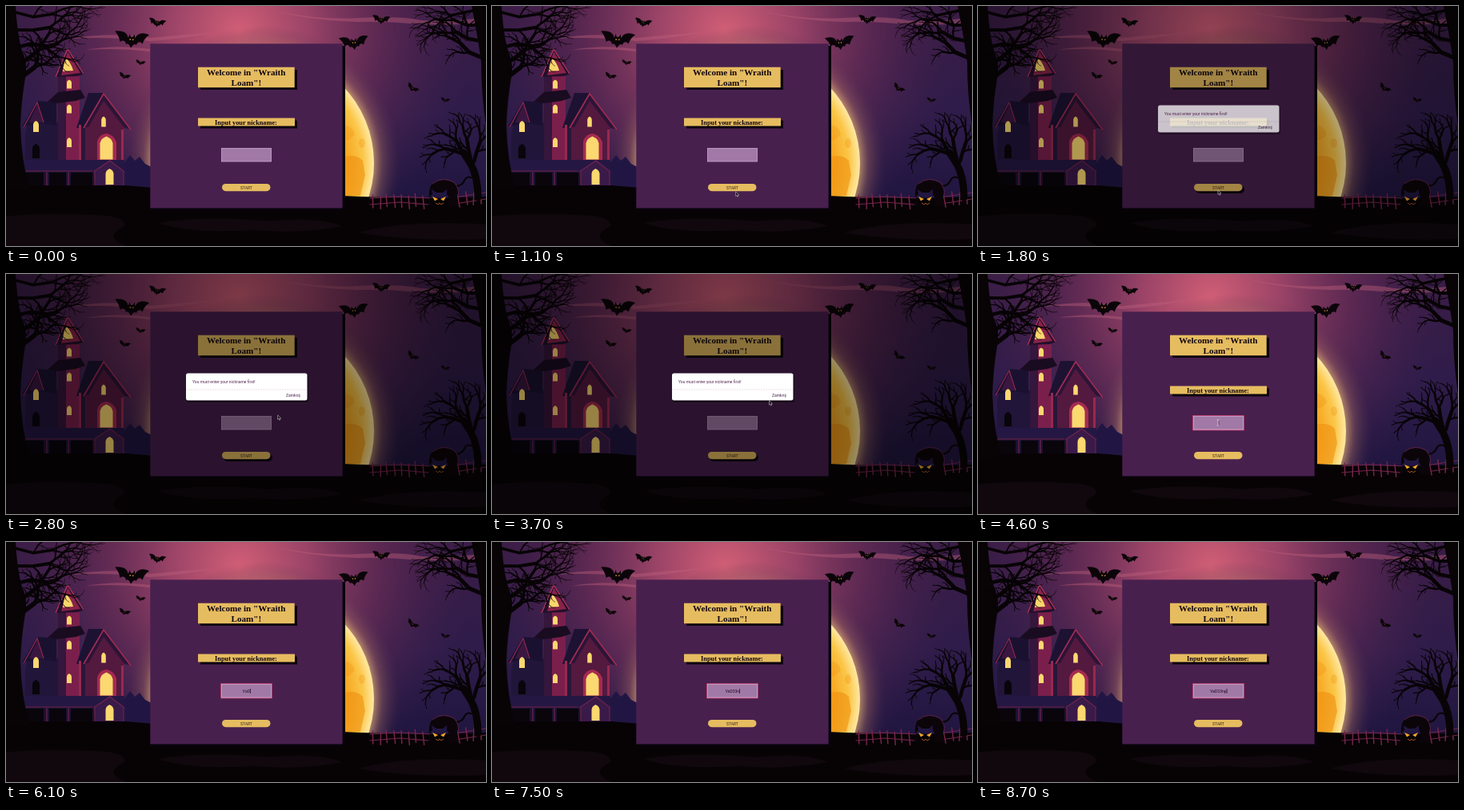
An HTML page for the animation above (8.8 s loop, 600x301 px).

```html
<!DOCTYPE html>
<html lang="en">
<head>
<meta charset="utf-8">
<title>Nickname form</title>
<style>
html, body { margin: 0; width: 100%; height: 100%; overflow: hidden; background: #070305; }
svg { display: block; width: 100%; height: 100%; }
.head { font: bold 11.1px "Liberation Serif", serif; fill: #12060f; text-anchor: middle; }
.ui { font: 5px Roboto, sans-serif; }
.mid { text-anchor: middle; }
</style>
</head>
<body>
<svg viewBox="0 0 600 301" preserveAspectRatio="none">
<defs>
  <linearGradient id="sky" x2="0" y2="1">
    <stop offset="0" stop-color="#3a1d46"/><stop offset=".45" stop-color="#2f1c4a"/><stop offset=".8" stop-color="#201640"/>
  </linearGradient>
  <radialGradient id="dusk" gradientUnits="userSpaceOnUse" cx="292" cy="32" r="290">
    <stop offset="0" stop-color="#d25f76"/><stop offset=".3" stop-color="#a3476a" stop-opacity=".92"/>
    <stop offset=".6" stop-color="#702f58" stop-opacity=".65"/><stop offset="1" stop-color="#45204c" stop-opacity="0"/>
  </radialGradient>
  <radialGradient id="glow" gradientUnits="userSpaceOnUse" cx="321" cy="197" r="172">
    <stop offset=".8" stop-color="#e8b878" stop-opacity=".7"/><stop offset=".87" stop-color="#9c6860" stop-opacity=".4"/>
    <stop offset="1" stop-color="#503050" stop-opacity="0"/>
  </radialGradient>
  <radialGradient id="moon" gradientUnits="userSpaceOnUse" cx="321" cy="197" r="139">
    <stop offset=".76" stop-color="#f7a824"/><stop offset=".9" stop-color="#fbc648"/><stop offset="1" stop-color="#ffe9a4"/>
  </radialGradient>
  <filter id="soft"><feGaussianBlur stdDeviation=".7"/></filter>
  <g id="bat">
    <path fill="#0b0509" d="M-20-8C-12-10-6-8-4-2L-3-6-1-3 1-3 3-6 4-2C6-8 13-10 20-7 16-4 14 0 13 4 10 1 7 2 6 6 4 4 2 6 0 10-2 6-4 4-6 6-7 2-10 1-13 4-14 0-16-4-20-8Z"/>
    <path fill="#f2a63a" d="M-2.500-1L-.5 0-2 1ZM2.500-1L.5 0 2 1Z"/>
  </g>
  <path id="arch" d="M-1 1V-.4Q-.9-.8 0-1 .9-.8 1-.4V1Z"/>
</defs>

<rect width="600" height="301" fill="url(#sky)"/>
<rect width="600" height="301" fill="url(#dusk)"/>
<g fill="#c0607c" opacity=".42">
  <path d="M335 6Q390 18 440 15T520 18Q560 20 600 14V20Q560 26 505 22 470 19 440 20 380 18 335 6Z"/>
  <path d="M80 41Q130 32 180 40 220 36 262 33 225 41 180 44 130 38 80 41Z"/>
  <path d="M100 55Q140 48 180 54V57Q140 52 100 55Z"/>
</g>
<circle cx="321" cy="197" r="172" fill="url(#glow)"/>
<circle cx="321" cy="197" r="139" fill="url(#moon)"/>
<g fill="#f0900f" opacity=".6">
  <path d="M420 190Q436 184 446 194L449 212 443 238H420Z"/>
  <path d="M420 149Q434 150 436 161 430 170 420 168Z" opacity=".5"/>
  <ellipse cx="445" cy="172" rx="4" ry="6" opacity=".5"/>
</g>

<path fill="#211643" d="M132 230V198L141 192 147 198 155 187 161 194 167 189 174 198 184 203V230Z"/>

<g id="house">
  <path fill="#21153a" d="M28 146H68V196H24V160Z"/>
  <path fill="#1a1130" d="M20 151L39 119 63 121V150L46 147Z"/>
  <path fill="#3b1740" d="M39 124L46 146H29Z"/>
  <path fill="none" stroke="#8a2750" stroke-width="1.300" d="M22 152L39 121 47 146"/>
  <path fill="#35163c" d="M65 86H76V196H65Z"/>
  <path fill="#7a1f4c" d="M75 86H92V196H75Z"/>
  <path fill="#28173a" d="M91 148H104V196H91Z"/>
  <path fill="#190c20" d="M52 120L65 108 93 105 99 115 87 119 64 122Z"/>
  <path fill="#23102c" d="M61 89L77 53 98 85 90 88Z"/>
  <path fill="#882349" d="M69 87L77 57 93 84Z"/>
  <path fill="none" stroke="#b93560" stroke-width="1.300" d="M62 89L77 54 97 85"/>
  <path fill="#fbd66c" d="M71 82Q72 70 76 66 82 73 84 81Z"/>
  <path fill="#54193f" d="M99 149L122 114 147 150V196H99Z"/>
  <path fill="#1d1232" d="M88 153L103 109H122L100 152Z"/>
  <path fill="#2c1438" d="M122 109L157 155 148 153 122 119 103 152H97Z"/>
  <path fill="none" stroke="#a32c53" stroke-width="1.600" d="M97 153L122 110 156 155"/>
  <path fill="#a52b50" d="M114 193V170Q117 160 126 160 135 162 138 171V193Z"/>
  <path fill="#97294f" d="M91 149H94V194H91ZM144 155H147V194H144Z"/>
  <path fill="#251743" d="M10 193H148V207H7Z"/>
  <path fill="#1b1231" d="M8 207H148V225H8Z"/>
  <path fill="#09050b" d="M14 209H47V225H14ZM54 209H75V225H54ZM81 209H108V225H81Z"/>
  <path fill="#3a1a48" d="M110 208L130 193 147 208V225H112Z"/>
  <path fill="none" stroke="#70244c" stroke-width="1.200" d="M109 208L130 194 148 208M8 207H108M51 208V225M78 208V225M111 208V225M147 208V225"/>
  <g fill="#fbd870">
    <use href="#arch" transform="translate(79 98)scale(3 5.500)"/>
    <use href="#arch" transform="translate(79 129)scale(3 5.500)"/>
    <use href="#arch" transform="translate(79 171)scale(3 6)"/>
    <use href="#arch" transform="translate(37.500 151)scale(3.500 7)"/>
    <use href="#arch" transform="translate(122 145)scale(2.800 6.500)"/>
    <use href="#arch" transform="translate(125.500 178)scale(8 14.500)"/>
    <use href="#arch" transform="translate(129.500 214)scale(5 10)"/>
  </g>
  <use href="#arch" transform="translate(37.500 182)scale(4.500 9)" fill="#09050b"/>
</g>

<path fill="#070305" d="M0 225H150L185 228 420 238Q520 243 600 239V301H0Z"/>
<g fill="#10080d">
  <path d="M0 264Q50 258 125 263 150 266 148 276 120 290 150 301H0Z"/>
  <path d="M190 272Q260 262 330 270 390 264 420 276 370 286 310 281 230 286 190 272Z"/>
  <path d="M440 284Q500 268 600 274V292Q510 296 440 284Z"/>
</g>
<g id="fence" stroke="#74244a" stroke-width="1.500" fill="none" stroke-linecap="round">
  <path stroke-width="1.200" d="M455 241L490 239 530 241M455 249L492 246 528 249M560 240L600 234M562 248L600 242"/>
</g>
<g id="trees" stroke="#080406" fill="none" stroke-linecap="round" stroke-linejoin="round">
  <path fill="#080406" stroke="none" d="M0 232V0H12Q14 35 20 56 27 70 24 90 19 120 18 150 19 195 30 230ZM600 0V150Q594 110 594 70 590 40 582 0Z"/>
</g>

<use href="#bat" transform="translate(157 42)rotate(5)scale(1.080)"/>
<use href="#bat" transform="translate(189 21)rotate(10)scale(.55)"/>
<use href="#bat" transform="translate(435 46)rotate(-6)scale(.92)"/>
<use href="#bat" transform="translate(469 17)rotate(5)scale(.57)"/>
<use href="#bat" transform="translate(148 88)rotate(18)scale(.38)"/>
<use href="#bat" transform="translate(168 71)rotate(12)scale(.32)"/>
<use href="#bat" transform="translate(508 103)rotate(35)scale(.42)"/>
<use href="#bat" transform="translate(549 118)rotate(10)scale(.3)"/>

<g id="cat" fill="#0b0509">
  <path d="M528 250Q527 240 533 236L532 230 538 234H546L551 230 551 236Q556 241 551 250L566 252 564 240Q568 228 559 221 546 215 536 221 528 224 529 240L532 250Z"/>
  <path fill="none" stroke="#0b0509" stroke-width="2.200" d="M561 226Q570 226 573 219T584 216"/>
  <path fill="none" stroke="#6c2444" stroke-width=".8" d="M533 223Q546 213 560 221 567 229 565 238"/>
  <path fill="#f5a52a" d="M533 239L540 242 536 244.500ZM550 239L543 242 547 244.500Z"/>
  <path fill="none" stroke="#e2702a" stroke-width=".7" d="M537 247L540 249 542 247 544 249 547 247"/>
</g>

<rect x="183" y="50" width="241" height="206" fill="#08030a" filter="url(#soft)"/>
<rect x="180.300" y="47.300" width="240.300" height="206.200" fill="#48204e"/>
<g fill="#0c050e" filter="url(#soft)">
  <rect x="243" y="80" width="121" height="25"/>
  <rect x="243" y="143.500" width="121" height="10"/>
  <rect id="lift" x="272" y="225.500" width="61" height="9.500" rx="4.700"/>
</g>
<g fill="#e6bc60">
  <rect x="240" y="76.700" width="120.700" height="25.500"/>
  <rect x="240" y="140.500" width="121" height="10"/>
  <rect x="270" y="223" width="60.500" height="9.200" rx="4.600"/>
</g>
<text class="head" x="300.300" y="87">Welcome in "Wraith</text>
<text class="head" x="300.300" y="100">Loam"!</text>
<text class="head" x="300" y="148.500" style="font-size:8.300px">Input your nickname:</text>
<text class="ui mid" x="300.400" y="229.500" fill="#3a2418">START</text>
<rect id="halo" x="268.900" y="177.900" width="63.200" height="17.700" fill="none" stroke="#d84878" stroke-width="1.300"/>
<rect id="field" x="269.500" y="178.500" width="62" height="16.500" fill="#a179a6" stroke="#c9a8cc" stroke-width=".8"/>
<text id="nick" class="ui mid" x="300.400" y="188.700" fill="#1c0a20"></text>
<rect id="caret" y="184" width=".7" height="6" fill="#1c0a20"/>

<rect id="shade" width="600" height="301"/>
<g id="modal">
  <rect x="226" y="126" width="152" height="35" rx="2.500" fill="#000" opacity=".45" filter="url(#soft)"/>
  <rect x="225" y="124.500" width="151.500" height="34" rx="2.500" fill="#fff"/>
  <text class="ui" x="233" y="137" fill="#55264f">You must enter your nickname first!</text>
  <path d="M225 145H376" stroke="#e6cfdd" stroke-width=".7" stroke-dasharray="2 1"/>
  <text class="ui" x="350" y="153.800" fill="#48204e">Zamknij</text>
</g>
<path id="arrow" d="M0 0V5.400L1.300 4.300 2.200 6.300 3.100 5.900 2.300 4 4 3.900Z" fill="#140a14" stroke="#e8dce8" stroke-width=".5"/>
<path id="beam" d="M-1.200-3.500Q0-3.500 0-2.500 0-3.500 1.200-3.500M0-2.500V3M-1.200 4Q0 4 0 3 0 4 1.200 4" fill="none" stroke="#e6d8e6" stroke-width=".7"/>
</svg>
<script>
const LOOP = 8800, STEP = 100, FADE = 300;
const OPEN = 1600, CLOSE = 3700, FOCUS = 4500;
const NAME = "VaD33np", TYPE_START = 5300, KEY_GAP = 400;
const $ = id => document.getElementById(id);

function line(parent, d, width) {
  const path = document.createElementNS("http://www.w3.org/2000/svg", "path");
  path.setAttribute("d", d);
  if (width) path.setAttribute("stroke-width", width);
  $(parent).append(path);
}

// Seeded random numbers keep the branches the same on every load
let seed = 41;
const rnd = () => (seed = seed * 16807 % 2147483647) / 2147483647;

function branch(x, y, angle, len, width) {
  if (len < 5) return;
  const bend = angle + (rnd() - .5) * .8;
  const mx = x + Math.cos(angle) * len * .5, my = y + Math.sin(angle) * len * .5;
  const ex = mx + Math.cos(bend) * len * .5, ey = my + Math.sin(bend) * len * .5;
  line("trees", `M${x} ${y}L${mx} ${my} ${ex} ${ey}`, width);
  branch(mx, my, bend + (rnd() < .5 ? -.9 : .9), len * .5, width * .5);
  branch(ex, ey, bend - .2 - rnd() * .4, len * .7, width * .66);
  branch(ex, ey, bend + .25 + rnd() * .4, len * .55, width * .55);
}

// Limbs up both tall trunks, then the small bare tree on the right
for (let i = 0; i < 5; i++) {
  branch(12, 8 + i * 22, .25 - i * .24, 46 - i * 4, 3.5 + i * .6);
  if (i < 4) branch(593, 4 + i * 20, Math.PI - .2 + i * .2, 36 - i * 2, 3.5 + i * .5);
}
line("trees", "M590 240Q590 215 581 198L572 184", 9);
for (let i = 0; i < 4; i++) branch(573 + i * 4, 186 + i * 3, -2.8 + i * .5, 25, 4.5);

for (let x = 458; x < 600; x += 9) {
  if (x > 524 && x < 562) continue;
  const top = 235 - Math.max(0, x - 545) * .08 + rnd() * 4;
  line("fence", `M${x + rnd() * 4 - 2} ${top}L${x + rnd() * 2} ${top + 16}`);
}

// Smooth progress from 0 to 1 between two times
function ease(t, from, to) {
  const k = Math.min(1, Math.max(0, (t - from) / (to - from)));
  return k * k * (3 - 2 * k);
}

const show = (id, on) => $(id).setAttribute("visibility", on ? "visible" : "hidden");

// The pointer goes to START, then Zamknij, then the field
function pointer(t) {
  const start = ease(t, 700, 1200), close = ease(t, 2300, 3100), field = ease(t, 3500, 4200);
  const x = 345 - 45 * start + 58 * close - 58 * field;
  const y = 250 - 19 * start - 79 * close + 34 * field;
  return `translate(${x} ${y})`;
}

function draw(t) {
  const open = ease(t, OPEN, OPEN + FADE) - ease(t, CLOSE, CLOSE + FADE);
  $("shade").setAttribute("opacity", open * .4);
  $("modal").setAttribute("opacity", open);

  const focus = t >= FOCUS;
  show("lift", t >= OPEN - 100 && !focus);
  show("halo", focus);
  show("field", true);

  const count = Math.min(NAME.length, Math.max(0, Math.floor((t - TYPE_START) / KEY_GAP) + 1));
  const nick = $("nick");
  nick.textContent = NAME.slice(0, count);
  const half = count ? nick.getComputedTextLength() / 2 : 0;
  const lastKey = count ? TYPE_START + (count - 1) * KEY_GAP : FOCUS;
  $("caret").setAttribute("x", 300.6 + half);
  show("caret", focus && (t - lastKey) % 1000 < 500);

  const inField = t >= 4200;
  for (const id of ["arrow", "beam"]) $(id).setAttribute("transform", pointer(t));
  show("arrow", t >= 700 && !inField);
  show("beam", inField && t < TYPE_START);
}

function tick(now) {
  draw(Math.floor(now % LOOP / STEP) * STEP);
  requestAnimationFrame(tick);
}
draw(0);
requestAnimationFrame(tick);
</script>
</body>
</html>
```
